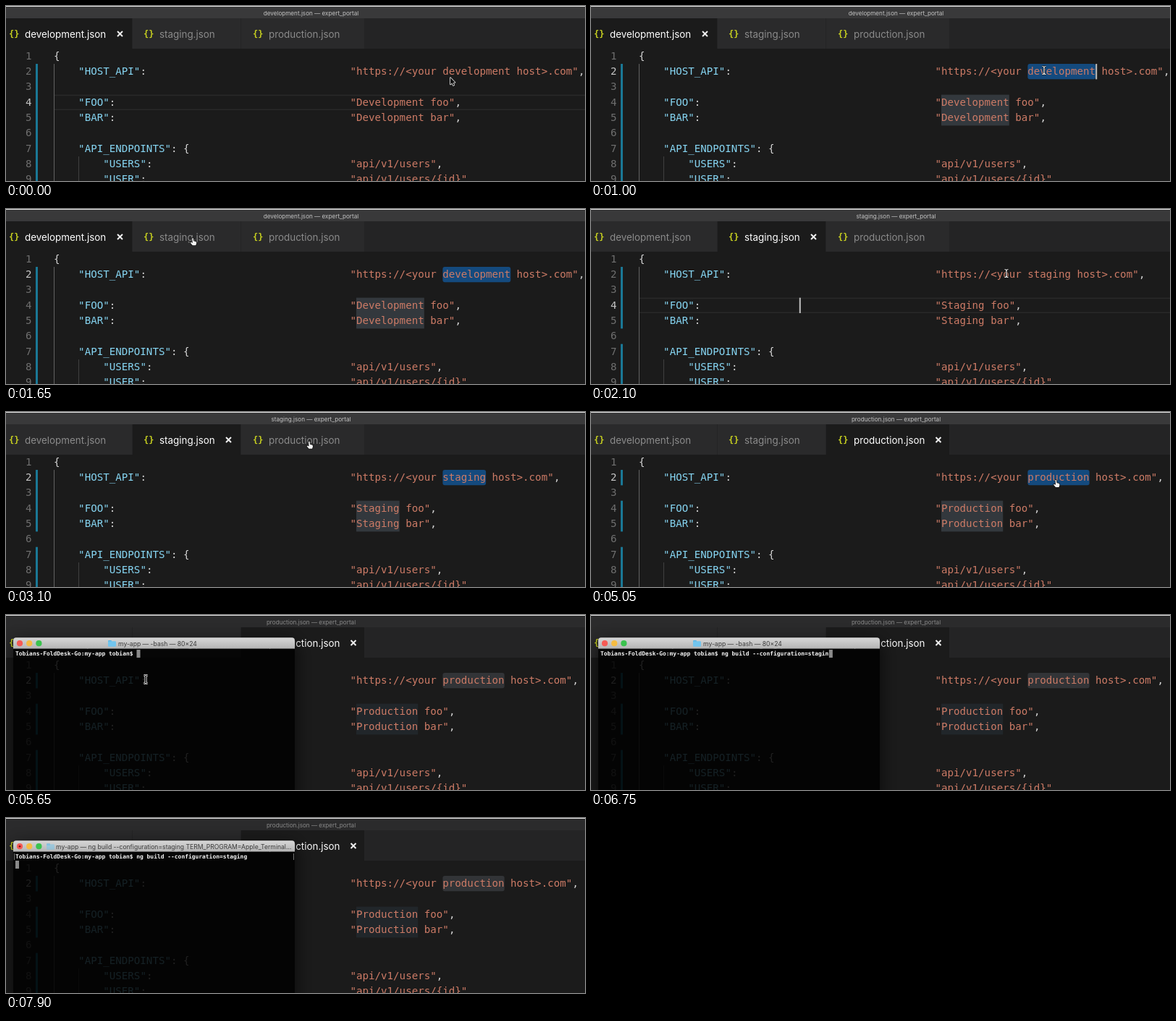
An HTML page with a canvas that plays this animation: 800x242 px, repeating every 8 s.

```html
<!DOCTYPE html>
<html lang="en">
<head>
<meta charset="utf-8">
<title>Environment config</title>
<style>
html, body { margin: 0; width: 100%; height: 100%; overflow: hidden; background: #1b1b1b; }
canvas { display: block; width: 800px; height: 242px; }
</style>
</head>
<body>
<canvas id="stage" width="800" height="242"></canvas>
<script>
const ctx = document.getElementById('stage').getContext('2d');
const LOOP = 8000, STEP = 50;
const MONO = '"DejaVu Sans Mono", monospace', SANS = 'Inter, sans-serif';
const CODE = '14.17px ' + MONO, CW = 8.53, LH = 21.33, X0 = 66, Y0 = 58.7;
const KEY = '#86d5f2', STR = '#cd7b66', PUNCT = '#d4d4d4';
const OPEN_TERM = 5100, ENTER = 7600;
const PROMPT = 'Tobians-FoldDesk-Go:my-app tobian$ ';
const COMMAND = 'ng build --configuration=staging';

// bars: first and last line of each change marker
const files = [
  { name: 'development', icon: 4, label: 26, close: 157.5, from: 0, to: 175, bars: [[2, 9]] },
  { name: 'staging', icon: 190, label: 212, close: 307.5, from: 175, to: 325, bars: [[2, 5], [7, 9]] },
  { name: 'production', icon: 341, label: 363, close: 480, from: 325, to: 496, bars: [[2, 2], [4, 5], [7, 9]] }
];

// editor states: start, file, line, caret column (-1 hidden), word selected
const states = [
  [0, 0, 4, -1, false],
  [800, 0, 2, 74, true],
  [1800, 1, 4, 26, false],
  [2400, 1, 2, 70, true],
  [3250, 2, 4, -1, false],
  [3900, 2, 2, 67.25, false],
  [4000, 2, 2, -1, true]
];

// pointer path: time, x, y
const path = [
  [0, 614, 99], [650, 626, 89], [1150, 626, 89], [1700, 250, 40], [1850, 250, 40],
  [2100, 574, 89], [2300, 632, 90], [2700, 632, 90], [3150, 412, 40], [3300, 412, 40],
  [3800, 641, 93], [4300, 642, 93], [5000, 643, 95], [5150, 643, 95], [5600, 193, 89], [5700, 193, 89]
];

function text(s, x, y, font, color, align = 'left') {
  ctx.font = font;
  ctx.fillStyle = color;
  ctx.textAlign = align;
  ctx.fillText(s, x, y);
}

function rect(x, y, w, h, color) {
  ctx.fillStyle = color;
  ctx.fillRect(x, y, w, h);
}

function rounded(x, y, w, h, r, color) {
  ctx.beginPath();
  ctx.roundRect(x, y, w, h, r);
  ctx.fillStyle = color;
  ctx.fill();
}

function dot(x, y, r, color) {
  ctx.beginPath();
  ctx.arc(x, y, r, 0, Math.PI * 2);
  ctx.fillStyle = color;
  ctx.fill();
}

const colX = c => X0 + c * CW;
const lineY = n => Y0 + (n - 1) * LH;
const code = (s, col, line, color) => text(s, colX(col), lineY(line) + 15, CODE, color);

function entry(line, indent, key, value, comma = ',') {
  const k = `"${key}"`;
  code(k, indent, line, KEY);
  code(':', indent + k.length, line, PUNCT);
  const v = `"${value}"`;
  code(v, 48, line, STR);
  code(comma, 48 + v.length, line, PUNCT);
}

function drawTabs(active) {
  rect(0, 17, 800, 42, '#242425');
  files.forEach((f, i) => {
    const on = i === active, w = f.to - f.from;
    rect(f.from, 17, w - 1, 42, on ? '#1b1b1b' : '#2a2a2b');
    text('{}', f.icon, 43, 'bold 12px ' + MONO, '#c6cf20');
    text(f.name + '.json', f.label, 44, '13.4px ' + SANS, on ? '#ffffff' : '#8b8b8b');
    if (!on) return;
    ctx.strokeStyle = '#f0f0f0';
    ctx.lineWidth = 2;
    ctx.beginPath();
    for (const d of [-1, 1]) {
      ctx.moveTo(f.close - 3.5, 38.5 - 3.5 * d);
      ctx.lineTo(f.close + 3.5, 38.5 + 3.5 * d);
    }
    ctx.stroke();
  });
}

function drawEditor(t, focused) {
  const [start, fileId, line, caret, selected] = states.filter(s => s[0] <= t).pop();
  const file = files[fileId];
  const word = file.name, title = word[0].toUpperCase() + word.slice(1);

  rect(0, 0, 800, 242, '#1b1b1b');
  rect(0, 0, 800, 17, focused ? '#39393a' : '#2b2b2c');
  rect(0, 0, 800, 1, '#e6e6e6');
  text(`${word}.json — expert_portal`, 421.5, 12.8, '8.15px ' + SANS, focused ? '#c4c4c4' : '#8a8a8a', 'center');
  drawTabs(fileId);

  if (!selected) {
    rect(X0, lineY(line), 734, 1.5, '#292929');
    rect(X0, lineY(line) + LH - 1.5, 734, 1.5, '#292929');
  } else {
    const w = word.length * CW;
    rounded(colX(63), lineY(2), w, LH, 3, focused ? '#144a7e' : '#323437');
    rect(colX(49), lineY(4), w, LH * 2, focused ? '#33383d' : '#21262a');
  }

  for (const [a, b] of file.bars) rect(41, lineY(a), 3, (b - a + 1) * LH, '#1a7896');
  rect(66, lineY(2), 1, 200, '#626262');
  rect(100, lineY(8), 1, 60, '#404040');

  for (let n = 1; n <= 9; n++) {
    text(n, 35.5, lineY(n) + 15, CODE, n === line ? '#c6c6c6' : '#6f6f6f', 'right');
  }
  code('{', 0, 1, PUNCT);
  entry(2, 4, 'HOST_API', `https://<your ${word} host>.com`);
  entry(4, 4, 'FOO', title + ' foo');
  entry(5, 4, 'BAR', title + ' bar');
  code('"API_ENDPOINTS"', 4, 7, KEY);
  code(': {', 19, 7, PUNCT);
  entry(8, 8, 'USERS', 'api/v1/users');
  entry(9, 8, 'USER', 'api/v1/users/{id}', '');

  if (caret >= 0 && (t - start) % 1000 < 500) rect(colX(caret), lineY(line), 2, LH, '#c0c0c0');
}

function typedCount(t) {
  if (t < 5700) return 0;
  if (t < 6500) return Math.min(25, Math.ceil((t - 5650) / STEP * 25 / 9));
  if (t < 7200) return 25 + Math.min(6, Math.floor((t - 6450) / STEP));
  return COMMAND.length;
}

function drawFolder(x, y) {
  rounded(x, y, 5, 3, 1, '#58b4e4');
  rounded(x, y + 1.3, 11, 7.5, 1, '#72c5ee');
}

function drawTerminal(t) {
  const entered = t >= ENTER;
  // shadow falls only outside the translucent window
  ctx.save();
  ctx.beginPath();
  ctx.rect(0, 0, 800, 242);
  ctx.roundRect(10, 31.2, 389, 260, 4);
  ctx.clip('evenodd');
  ctx.shadowColor = 'rgba(0,0,0,.7)';
  ctx.shadowBlur = 26;
  ctx.shadowOffsetY = 7;
  rounded(10, 31.2, 389, 260, 4, '#000');
  ctx.restore();

  rect(10, 46.5, 389, 196, 'rgba(0,0,0,.85)');
  const bar = ctx.createLinearGradient(0, 31, 0, 46.5);
  bar.addColorStop(0, '#d8d8d8');
  bar.addColorStop(1, '#b4b4b4');
  rounded(10, 31.2, 389, 15.3, [4, 4, 0, 0], bar);
  ['#f65b55', '#f5bc42', '#3bc34e'].forEach((c, i) => dot(19 + i * 13.2, 39.2, 4.1, c));
  if (entered) dot(19, 39.2, 1.3, '#7a1512');

  const font = '8.6px ' + SANS;
  ctx.globalAlpha = entered ? .5 : 1;
  drawFolder(entered ? 56 : 141, 35);
  ctx.globalAlpha = 1;
  if (entered) text(`my-app — ${COMMAND} TERM_PROGRAM=Apple_Terminal…`, 69, 42.5, font, '#3c3c3c');
  else text('my-app — -bash — 80×24', 155, 42.5, font, '#3c3c3c');

  const count = typedCount(t), size = 7.95;
  text(PROMPT + COMMAND.slice(0, count), 13, 56.3, `bold ${size}px ` + MONO, '#f4f4f4');
  if (entered) {
    rect(11, 49, 1, 9, '#777');
    rect(397, 49, 1, 9, '#777');
    rect(13, 59, 5, 11, '#8a8a8a');
  } else {
    rect(13 + (PROMPT.length + count) * size * .602, 48, 5, 11, '#8a8a8a');
  }
}

function outline(points, x, y, fill, stroke) {
  ctx.beginPath();
  points.forEach(([px, py]) => ctx.lineTo(x + px, y + py));
  ctx.closePath();
  ctx.lineJoin = 'round';
  ctx.lineWidth = 1.6;
  ctx.strokeStyle = stroke;
  ctx.stroke();
  ctx.fillStyle = fill;
  ctx.fill();
}

const ARROW = [[0, 0], [0, 9.5], [2.2, 7.6], [3.8, 11], [5.2, 10.3], [3.7, 7], [6.5, 6.8]];
const HAND = [[-1.5, -1], [0, -1], [.5, 3], [4, 4], [4.5, 6], [3.5, 9], [-1, 9], [-4, 5.5], [-3, 4.7], [-1, 5.8]];

// the terminal shows a white beam with a dark core
function drawBeam(x, y, hollow) {
  const strokes = hollow ? [[3.2, '#e8e8e8'], [1, '#111']] : [[2.6, '#111'], [1.2, '#f2f2f2']];
  for (const [w, color] of strokes) {
    ctx.strokeStyle = color;
    ctx.lineWidth = w;
    ctx.beginPath();
    for (const s of [-1, 1]) {
      ctx.moveTo(x + 2.5 * s, y - 5.5);
      ctx.quadraticCurveTo(x, y - 5.5, x, y - 3.5);
      ctx.lineTo(x, y + 3.5);
      ctx.quadraticCurveTo(x, y + 5.5, x + 2.5 * s, y + 5.5);
    }
    ctx.stroke();
  }
}

function drawPointer(t) {
  const i = path.findIndex(p => p[0] > t);
  if (i < 0) return;
  const [t0, x0, y0] = path[i - 1], [t1, x1, y1] = path[i];
  const p = (t - t0) / (t1 - t0), e = p * p * (3 - 2 * p);
  const x = x0 + (x1 - x0) * e, y = y0 + (y1 - y0) * e;
  if (t < 300) outline(ARROW, x, y, '#111', '#eee');
  else if (y < 59 || (t >= 5000 && t < 5150)) outline(HAND, x, y, '#f4f4f4', '#111');
  else drawBeam(x, y, t >= OPEN_TERM && x < 399);
}

function draw(now) {
  const t = Math.floor(now % LOOP / STEP) * STEP;
  ctx.clearRect(0, 0, 800, 242);
  drawEditor(t, t < OPEN_TERM);
  if (t >= OPEN_TERM) drawTerminal(t);
  drawPointer(t);
}

let origin;
function tick(now) {
  origin ??= now;
  draw(now - origin);
  requestAnimationFrame(tick);
}
requestAnimationFrame(tick);
</script>
</body>
</html>
```
